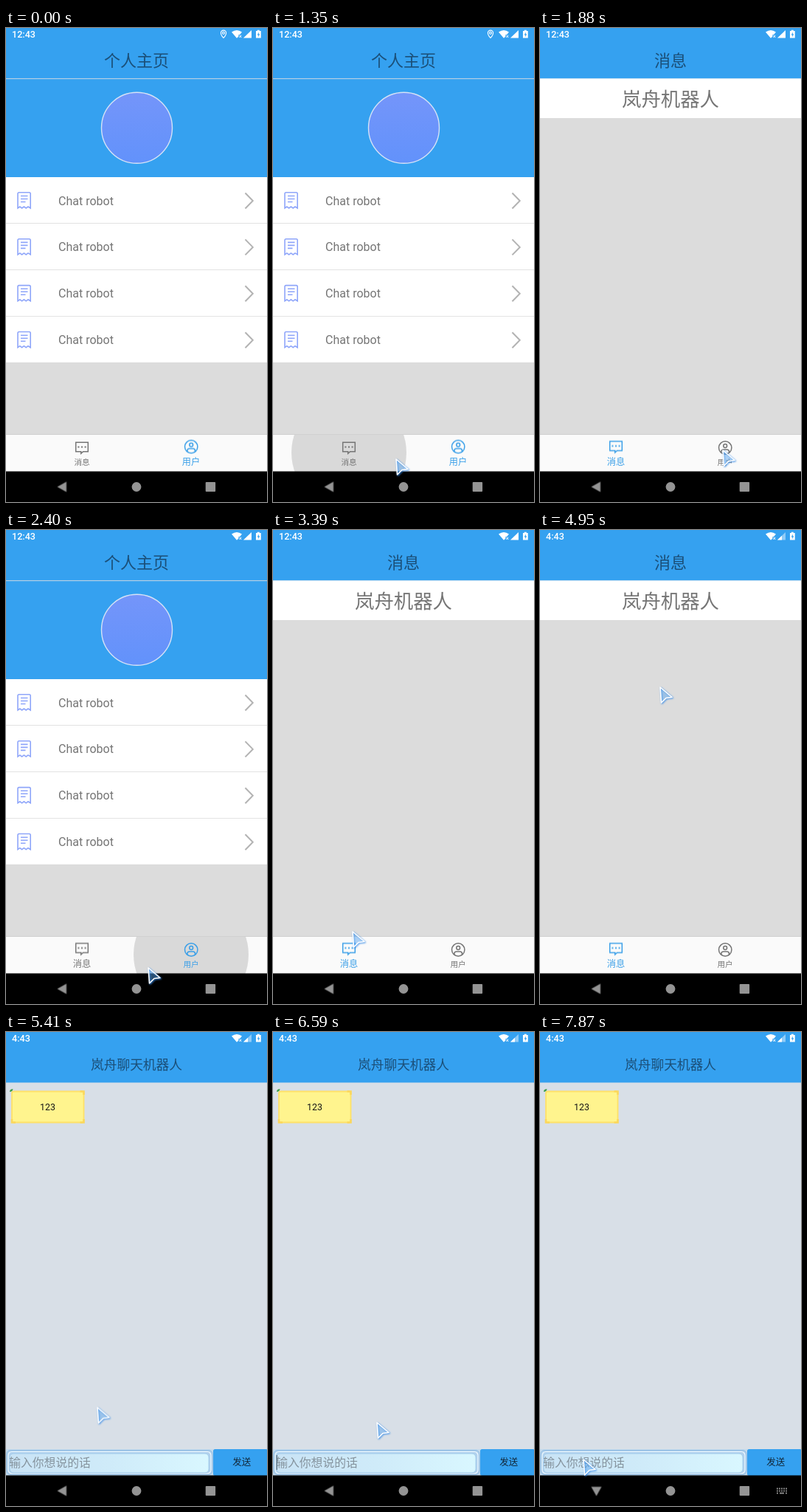
These frames come from a looping animation (354x642 px, 8000 ms). An HTML page:

```html
<!DOCTYPE html>
<html lang="zh-CN">
<head>
<meta charset="utf-8">
<title>Chat app</title>
<style>
html, body { margin: 0; width: 100%; height: 100%; overflow: hidden; background: #dcdcdc; }
svg.stage { display: block; width: 100vw; height: 100vh; }
text { font-family: Roboto, "Noto Sans CJK SC", "Noto Sans CJK", sans-serif; }
.mid { text-anchor: middle; }
.blue { fill: #35a1f0; }
.title { font-size: 22px; fill: #1b4f78; }
.clock { font-size: 12.6px; font-weight: 500; fill: #fff; }
.line { fill: none; stroke: currentColor; stroke-width: 1.5; }
.tab text { font-size: 10.6px; fill: currentColor; }

/* One loop is 8 s, so 1% is 80 ms */
.profile, .early, .late, .msgTab, .userTab, .pin, .caret, .back, .keys {
  animation: 8s step-end infinite;
}
.profile { animation-name: profile; }
.pin { animation-name: pin; }
.early { animation-name: early; }
.late { animation-name: late; }
.msgTab { animation-name: msgTint; }
.userTab { animation-name: userTint; }
.caret { animation-name: caret; }
.back { animation-name: back; }
.keys { animation-name: keys; }
.icon { --on: translateY(-1.4px); --off: none; }
.label { --on: translateY(-1px) scale(1.15); --off: none; }
.msgTab .label { transform-origin: 103px 588px; }
.userTab .label { transform-origin: 251px 588px; }
.msgTab > g { animation: msgSize 8s linear infinite; }
.userTab > g { animation: userSize 8s linear infinite; }
.msgRipple { transform-origin: 103px 575px; animation: msgRipple 8s linear infinite; }
.userRipple { transform-origin: 251px 575px; animation: userRipple 8s linear infinite; }
.press { animation: press 8s linear infinite; }
.chat { animation: chat 8s linear infinite; }
.cursor { animation: cursor 8s linear infinite; filter: drop-shadow(1.2px 1.5px 1px #2f86e6); }

@keyframes profile {
  0%, 29.125% { opacity: 1; }
  17.875%, 40.5%, 100% { opacity: 0; }
}
@keyframes pin { 0% { opacity: 1; } 18.75%, 100% { opacity: 0; } }
@keyframes early { 0% { opacity: 1; } 53%, 100% { opacity: 0; } }
@keyframes late { 0% { opacity: 0; } 53%, 100% { opacity: 1; } }
@keyframes msgTint {
  0%, 29.125% { color: #757575; }
  17.875%, 40.5%, 100% { color: #3a9fe8; }
}
@keyframes userTint {
  0%, 29.125% { color: #3a9fe8; }
  17.875%, 40.5%, 100% { color: #757575; }
}
@keyframes msgSize {
  0%, 17.875%, 32%, 40.5% { transform: var(--off); }
  18.9%, 31%, 41.5%, 100% { transform: var(--on); }
}
@keyframes userSize {
  0%, 17.875%, 32%, 40.5% { transform: var(--on); }
  18.9%, 31%, 41.5%, 100% { transform: var(--off); }
}
@keyframes msgRipple {
  0%, 14.1% { transform: scale(0); opacity: 1; }
  16.25%, 17.8% { transform: scale(1); opacity: 1; }
  20.6% { transform: scale(1); opacity: 0; }
  20.7%, 38.4% { transform: scale(0); opacity: 1; }
  40%, 40.5% { transform: scale(1); opacity: 1; }
  42.3%, 100% { transform: scale(1); opacity: 0; }
}
@keyframes userRipple {
  0%, 26.3% { transform: scale(0); opacity: 1; }
  28.75%, 31% { transform: scale(1); opacity: 1; }
  34%, 100% { transform: scale(1); opacity: 0; }
}
@keyframes press {
  0%, 48.9% { opacity: 0; }
  50%, 52% { opacity: .12; }
  54.5%, 100% { opacity: 0; }
}
@keyframes chat {
  0%, 62.75% { opacity: 0; transform: translateY(26px); }
  65.6%, 100% { opacity: 1; transform: none; }
}
@keyframes caret {
  0%, 85.625%, 98.125%, 100% { opacity: 0; }
  79.375%, 91.875% { opacity: 1; }
}
@keyframes back { 0% { transform: none; } 92.75%, 100% { transform: rotate(-90deg); } }
@keyframes keys { 0% { opacity: 0; } 92.75%, 100% { opacity: 1; } }
@keyframes cursor {
  0%, 4.49% { transform: translate(180px, 660px); }
  4.5% { transform: translate(180px, 607px); }
  8.375%, 14.125% { transform: translate(108px, 571px); }
  15.5% { transform: translate(126px, 575px); }
  16.875%, 17.75% { transform: translate(166px, 583px); }
  20% { transform: translate(210px, 586px); }
  23.5% { transform: translate(247px, 571px); }
  24.375%, 27% { transform: translate(249px, 571px); }
  30%, 31% { transform: translate(192px, 592px); }
  34.625%, 39.5% { transform: translate(108px, 571px); }
  42.375%, 43.3% { transform: translate(107px, 543px); }
  48.125%, 52% { transform: translate(150px, 116px); }
  61.875%, 62.75% { transform: translate(162px, 212px); }
  69% { transform: translate(112px, 590px); }
  71.5%, 73.25% { transform: translate(106px, 567px); }
  75.375%, 80.5% { transform: translate(106px, 560px); }
  82.375%, 83.3% { transform: translate(140px, 528px); }
  86% { transform: translate(139px, 466px); }
  90.75% { transform: translate(136px, 482px); }
  91.75% { transform: translate(130px, 497px); }
  98.375%, 100% { transform: translate(58px, 578px); }
}
</style>
</head>
<body>
<svg class="stage" viewBox="0 0 354 642" preserveAspectRatio="none">
  <defs>
    <clipPath id="bar"><rect y="551" width="354" height="50"/></clipPath>
    <linearGradient id="ice">
      <stop offset="0" stop-color="#c9e3f5"/>
      <stop offset=".5" stop-color="#cfebf9"/>
      <stop offset="1" stop-color="#d9f7ff"/>
    </linearGradient>
    <linearGradient id="avatar" x2="0" y2="1">
      <stop offset="0" stop-color="#7495fa"/>
      <stop offset="1" stop-color="#6292fb"/>
    </linearGradient>
    <g id="row">
      <rect y="202" width="354" height="62.2" fill="#fff"/>
      <g fill="none" stroke="#8fa6fa" stroke-width="1.6">
        <path d="M16 244V224.500q0-1.700 1.700-1.700h13.800q1.700 0 1.700 1.700V244l-3.200-2-2.800 2-2.800-2-2.800 2-2.800-2z"/>
        <path d="M20 227.500h9.500M20 231.500h9.500M20 235.500h6.500"/>
      </g>
      <text x="71" y="239.600" font-size="16" fill="#757575">Chat robot</text>
      <path d="M324.500 223.500l10.300 10.500-10.300 10.500" fill="none" stroke="#b3b3b3" stroke-width="2"/>
    </g>
  </defs>

  <rect width="354" height="642" fill="#dcdcdc"/>

  <!-- Message list -->
  <rect class="blue" width="354" height="68.500"/>
  <text class="title mid" x="177" y="52">消息</text>
  <rect y="68.500" width="354" height="53.500" fill="#fff"/>
  <text class="mid" x="177" y="106" font-size="26.4" fill="#757575">岚舟机器人</text>
  <rect class="press" y="69" width="354" height="53"/>

  <!-- Profile -->
  <g class="profile">
    <rect y="68" width="354" height="483" fill="#dcdcdc"/>
    <rect class="blue" width="354" height="202"/>
    <text class="title mid" x="177" y="52">个人主页</text>
    <rect y="68" width="354" height="1.200" fill="#b4cfe4"/>
    <circle cx="177.500" cy="135.300" r="48" fill="url(#avatar)" stroke="#d5e2f6" stroke-width="1.4"/>
    <rect y="202" width="354" height="251" fill="#d6d6d6"/>
    <use href="#row"/>
    <use href="#row" y="62.900"/>
    <use href="#row" y="125.800"/>
    <use href="#row" y="188.700"/>
  </g>

  <!-- Tabs -->
  <rect y="550" width="354" height="1" fill="#d0d0d0"/>
  <rect y="551" width="354" height="50" fill="#fafafa"/>
  <g clip-path="url(#bar)" fill-opacity=".13">
    <circle class="msgRipple" cx="103" cy="575" r="78"/>
    <circle class="userRipple" cx="251" cy="575" r="78"/>
  </g>
  <g class="tab msgTab">
    <g class="icon">
      <path class="line" d="M94.700 561.200h16.600v12.600h-6.600l-3 2.600v-2.600h-7z"/>
      <path d="M97.400 566.600h2v2h-2zm4.600 0h2v2h-2zm4.600 0h2v2h-2z" fill="currentColor"/>
    </g>
    <g class="label"><text class="mid" x="103" y="592">消息</text></g>
  </g>
  <g class="tab userTab">
    <g class="icon">
      <circle class="line" cx="251.200" cy="568.500" r="8.700"/>
      <circle class="line" cx="251.200" cy="566" r="2.400"/>
      <path class="line" d="M245.900 575.200v-1.200q0-3 3-3h4.600q3 0 3 3v1.200"/>
    </g>
    <g class="label"><text class="mid" x="251" y="592">用户</text></g>
  </g>

  <!-- Chat -->
  <g class="chat">
    <rect y="68" width="354" height="574" fill="#d8dfe7"/>
    <rect class="blue" width="354" height="68.500"/>
    <text class="mid" x="177" y="50.600" font-size="17.7" fill="#1b4f78">岚舟聊天机器人</text>
    <rect x="8" y="80.500" width="97.500" height="42" rx="2.500" fill="#fff48e" stroke="#ffe168" stroke-width="1.800"/>
    <path d="M8 118v4.500h5M100.500 122.500h5V118M105.500 85v-4.500h-5" fill="none" stroke="#fbd75c" stroke-width="2.600"/>
    <path d="M5 81q0-4 4.500-3.800-.5 3.500-4.500 3.800z" fill="#3fa04a"/>
    <text class="mid" x="56.500" y="106.400" font-size="12.4" fill="#151515">123</text>

    <rect y="565" width="281" height="36" fill="#c3dbee"/>
    <rect x="1" y="566.500" width="279" height="33" rx="5" fill="#b1d1ed" stroke="#8fbbe2"/>
    <rect x="3" y="568.500" width="275" height="29.500" rx="5" fill="none" stroke="#edf8ff" stroke-width="1.200"/>
    <rect x="5" y="571" width="270" height="26" rx="5" fill="url(#ice)" stroke="#a3cdec"/>
    <text x="4.200" y="589" font-size="15.8" fill="#85939d">输入你想说的话</text>
    <rect class="caret" x="4.500" y="573" width="1.400" height="20" fill="#5f707c"/>
    <rect class="blue" x="281" y="565" width="74" height="36" rx="2.500"/>
    <text class="mid" x="319.700" y="587.400" font-size="12.5" fill="#12283a">发送</text>
  </g>

  <!-- Status bar -->
  <text class="clock early" x="8" y="13.300">12:43</text>
  <text class="clock late" x="8" y="13.300">4:43</text>
  <g fill="#fff">
    <path class="pin" d="M295 13.500q-3.600-4-3.600-6.800a3.600 3.600 0 0 1 7.200 0q0 2.800-3.600 6.800zM295 5.200a1.500 1.500 0 1 0 .01 0z" fill="none" stroke="#fff" stroke-width="1.100"/>
    <path d="M306 5.600q7-5 14 0l-2.800 3.500h-1.800v2.300l-2.400 2.400z"/>
    <path d="M316.300 9.800l3 3.200m0-3.200l-3 3.200" stroke="#fff" stroke-width="1"/>
    <path class="early" d="M322 13.500h11V3z"/>
    <g class="late">
      <path d="M322 13.500h11V3z" opacity=".45"/>
      <path d="M322 13.500h6V7.800z"/>
    </g>
    <path d="M340.800 2.800h3v1.200h2v9.600h-6.800V4h1.800z"/>
    <path d="M342.800 5.500l-2 4h1.400v2.800l2-4h-1.400z" fill="#35a1f0"/>
  </g>

  <!-- Navigation bar -->
  <rect y="600.500" width="354" height="42"/>
  <g fill="#949494">
    <g transform="translate(76.500 621.500)">
      <path class="back" d="M-7 0L5.500-7v14z"/>
    </g>
    <circle cx="177" cy="621.500" r="6.400"/>
    <rect x="270.700" y="615" width="13.400" height="13" rx="1"/>
    <g class="keys" fill="none" stroke="#949494" stroke-width="1.800">
      <path d="M321 618.500h14M321 621.600h14" stroke-dasharray="1.800 1.250"/>
      <path d="M321 624.700h2M325 624.700h6M333 624.700h2"/>
    </g>
  </g>

  <g class="cursor">
    <path d="M1 1L17 14.500 9 15.500 2.500 22z" fill="#78b9f5" fill-opacity=".28" stroke="#fff" stroke-width="1.600" stroke-linejoin="round"/>
  </g>
</svg>
</body>
</html>
```
